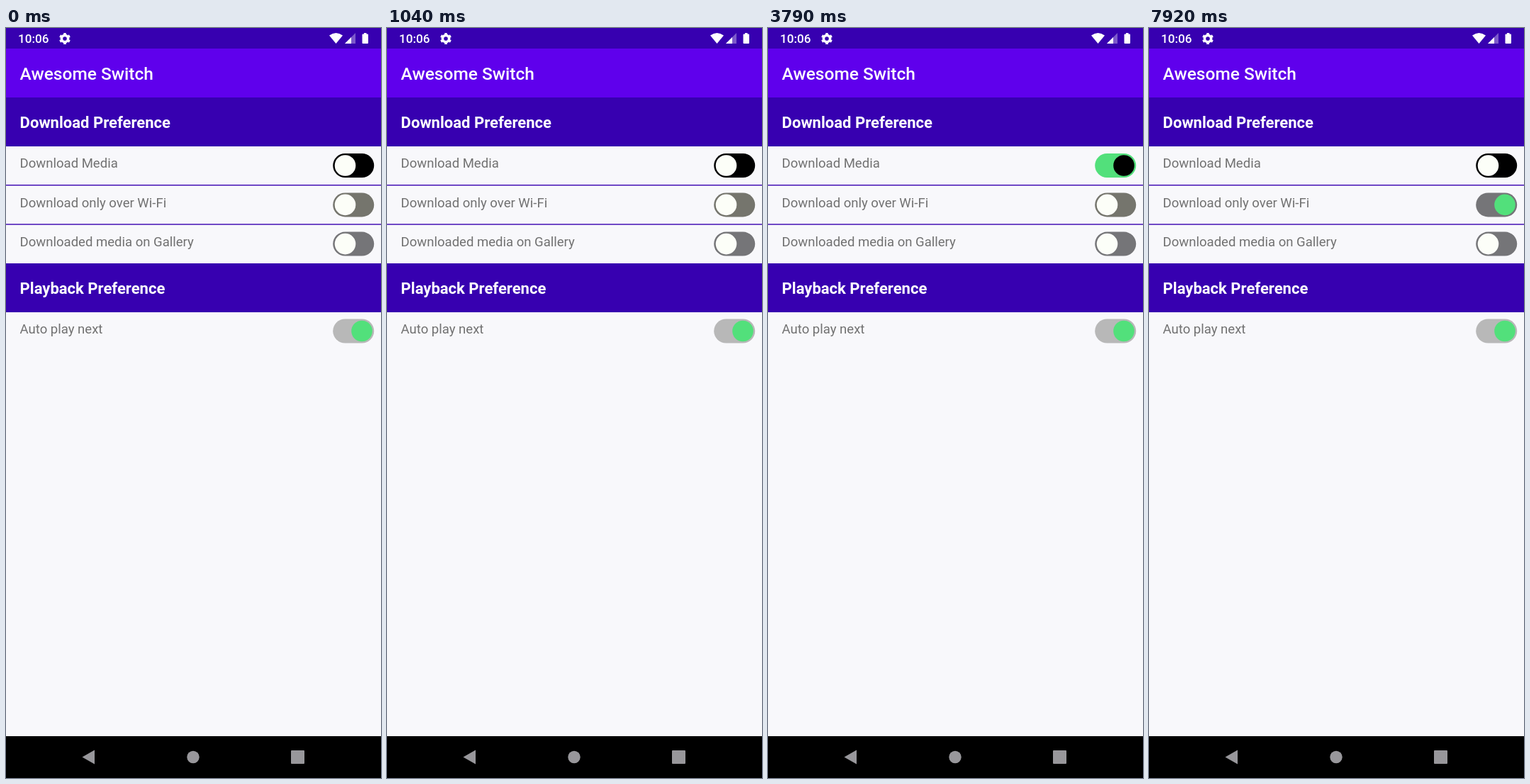
Animation, 529 px wide and 1058 px high, one loop 8 s. Source, as an HTML page:

```html
<!DOCTYPE html>
<html lang="en">
<head>
<meta charset="utf-8">
<title>Switch preferences</title>
<style>
  html, body { margin: 0; width: 100%; height: 100%; overflow: hidden; background: #f8f8fb; }
  svg { display: block; width: 100vw; height: 100vh; font-family: Roboto, sans-serif; }
  .title { font-size: 24.5px; font-weight: 500; fill: #fff; }
  .head { font-size: 22.04px; font-weight: 700; fill: #fff; }
  .row { font-size: 18.55px; fill: #717171; }
  .clock { font-size: 17.14px; font-weight: 500; fill: #fff; }
</style>
</head>
<body>
<svg viewBox="0 0 529 1058">
  <rect width="529" height="1058" fill="#f8f8fb"/>
  <rect width="529" height="29" fill="#3700b0"/>
  <rect y="29" width="529" height="69" fill="#5f00ec"/>
  <g fill="#3700b0">
    <rect y="98" width="529" height="69"/>
    <rect y="332" width="529" height="69"/>
    <rect y="221" width="529" height="1.4"/>
    <rect y="276.3" width="529" height="1.4"/>
  </g>

  <text class="clock" x="17" y="21">10:06</text>
  <g fill="none" stroke="#fff">
    <circle cx="83" cy="15" r="4.6" stroke-width="3.6"/>
    <circle cx="83" cy="15" r="6.8" stroke-width="2.4" pathLength="12" stroke-dasharray="1 1" stroke-dashoffset="-.5"/>
  </g>
  <g fill="#fff">
    <path d="M456 10.5Q465.500 3.500 475 10.500L465.500 22Z"/>
    <path d="M493 7V22H478Z" opacity=".35"/>
    <path d="M487 13V22H478Z"/>
    <path d="M505 7h3.500v1.500h1.500q1 0 1 1V21q0 1-1 1h-6.500q-1 0-1-1V9.500q0-1 1-1h1.500z"/>
  </g>

  <text class="title" x="19.6" y="73">Awesome Switch</text>
  <text class="head" x="19.6" y="141">Download Preference</text>
  <text class="head" x="19.6" y="375">Playback Preference</text>
  <g id="rows"></g>

  <rect y="999" width="529" height="59"/>
  <g fill="#98979b">
    <path d="M107.500 1028.500L125 1018.500V1038.500Z"/>
    <circle cx="264" cy="1028.5" r="8.7"/>
    <rect x="402" y="1019" width="19" height="19" rx="1"/>
  </g>
</svg>
<script>
const LOOP = 8000, SLIDE = 300, TINT_LAG = 30;
const WHITE = [252, 254, 248], GREEN = [82, 224, 123], BLACK = [0, 0, 0];
const GREY = [117, 117, 120], WARM = [117, 117, 109], PALE = [184, 184, 184];

// track and knob: colours when off and on; flips: times of each toggle
const rows = [
  { label: 'Download Media', y: 194, track: [BLACK, GREEN], knob: [WHITE, BLACK], flips: [2733, 6701] },
  { label: 'Download only over Wi-Fi', y: 249.4, track: [WARM, GREY], knob: [WHITE, GREEN], flips: [4660] },
  { label: 'Downloaded media on Gallery', y: 304.6, track: [GREY, GREY], knob: [WHITE, GREEN], flips: [] },
  { label: 'Auto play next', y: 427.5, track: [PALE, PALE], knob: [WHITE, GREEN], flips: [], on: 1 },
];

function add(parent, name, attrs) {
  const el = document.createElementNS('http://www.w3.org/2000/svg', name);
  for (const key in attrs) el.setAttribute(key, attrs[key]);
  return parent.appendChild(el);
}

const group = document.getElementById('rows');
for (const row of rows) {
  add(group, 'text', { class: 'row', x: 19.6, y: row.y + 3.3 }).textContent = row.label;
  row.trackEl = add(group, 'rect', { x: 461.2, y: row.y - 17, width: 58, height: 34, rx: 17 });
  row.knobEl = add(group, 'circle', { cy: row.y, r: 14.8 });
}

const ease = p => (1 - Math.cos(Math.PI * Math.min(1, Math.max(0, p)))) / 2;
const mix = ([a, b], k) => `rgb(${a.map((v, i) => Math.round(v + (b[i] - v) * k))})`;

// 0 is off, 1 is on; successive flips alternate direction
const state = (row, t) => row.flips.reduce(
  (s, start, i) => s + (i % 2 ? -1 : 1) * ease((t - start) / SLIDE), row.on || 0);

function draw(now) {
  const t = now % LOOP;
  for (const row of rows) {
    const tint = state(row, t - TINT_LAG);
    row.knobEl.setAttribute('cx', 478.5 + 23.5 * state(row, t));
    row.knobEl.setAttribute('fill', mix(row.knob, tint));
    row.trackEl.setAttribute('fill', mix(row.track, tint));
  }
}

const begin = performance.now();
function tick() {
  draw(performance.now() - begin);
  requestAnimationFrame(tick);
}
tick();
</script>
</body>
</html>
```
